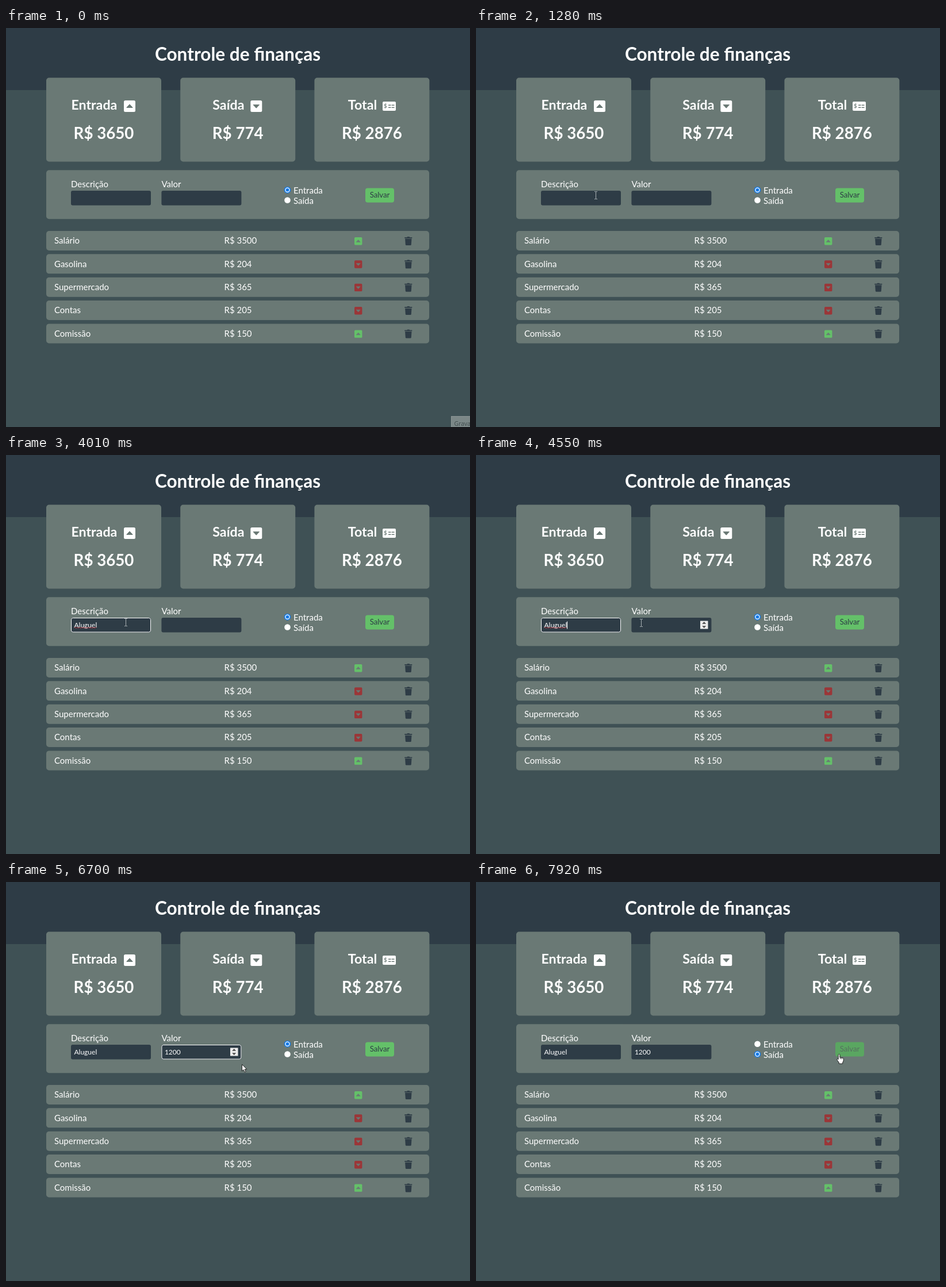
An HTML page that plays this animation: 807x694 px, repeating every 7.99 s.

```html
<!DOCTYPE html>
<html lang="pt-BR">
<head>
<meta charset="utf-8">
<title>Controle de finanças</title>
<style>
  html, body { margin: 0; height: 100%; overflow: hidden; background: #3f5155; }
  svg { display: block; font: 15px Lato, sans-serif; fill: #fff; }
  .dark { fill: #2e3c46; }
  .panel { fill: #6a7975; }
  .bold { font-weight: 700; }
  .mid { text-anchor: middle; }
  .typed { font-size: 12px; white-space: pre; }
  .ring { fill: none; stroke: #fff; }
</style>
</head>
<body>
<svg id="stage" width="807" height="694" viewBox="0 0 807 694"></svg>
<script>
const LOOP = 7990, BLINK = 530;
const GREEN = '#64c069', RED = '#9b3638';
const $ = id => document.getElementById(id);

const box = (x, y, w, h, r, cls, extra = '') =>
  `<rect x="${x}" y="${y}" width="${w}" height="${h}" rx="${r}" class="${cls}" ${extra}/>`;
const text = (x, y, str, cls = '', size = 15, extra = '') =>
  `<text x="${x}" y="${y}" class="${cls}" style="font-size:${size}px" ${extra}>${str}</text>`;
const caretSquare = (x, y, size, color, up) =>
  `<g transform="translate(${x} ${y}) scale(${size / 20})"><rect width="20" height="20" rx="2.5" fill="${color}"/>
   <path class="panel" stroke="#6a7975" stroke-linejoin="round" d="${up ? 'M4.8 12.4h10.4L10 6.8z' : 'M4.8 7.6h10.4L10 13.2z'}"/></g>`;
const trash = (x, y) =>
  `<path class="dark" transform="translate(${x} ${y})" d="M0 1h4l.8-1h3.4l.8 1h4v1.8h-13z
   M.8 3.6h11.4l-.7 10.2a1.4 1.4 0 0 1-1.4 1.2h-7.2a1.4 1.4 0 0 1-1.4-1.2z"/>`;
const card = (x, title, titleX, value) =>
  box(x, 86.5, 200, 146, 5, 'panel') + text(titleX, 142, title, 'bold', 23.2) +
  text(x + 100, 193, value, 'bold mid', 27.7);
const field = (x, label, id) =>
  text(x, 276.5, label) + box(x, 283, 139, 25.5, 3, 'dark') +
  `<text id="${id}" class="typed" x="${x + 5.5}" y="300.3"></text>` +
  box(x + .5, 283.5, 138, 24.5, 3, 'ring', `id="${id}Ring"`);
const radio = (y, label, id) =>
  `<circle cx="489.5" cy="${y}" r="5.3"/><g id="${id}"><circle cx="489.5" cy="${y}" r="5" fill="#fff" stroke="#0f78e6" stroke-width="1.6"/>
   <circle cx="489.5" cy="${y}" r="2.9" fill="#0f78e6"/></g>` + text(500, y + 6.3, label);

const rows = [['Salário', 3500, 1], ['Gasolina', 204, 0], ['Supermercado', 365, 0], ['Contas', 205, 0], ['Comissão', 150, 1]];

$('stage').innerHTML =
  box(0, 0, 807, 108, 0, 'dark') +
  text(403, 56.5, 'Controle de finanças', 'bold mid', 31.6) +
  card(70, 'Entrada', 113.5, 'R$ 3650') + caretSquare(205, 126, 20, '#fff', 1) +
  card(303.2, 'Saída', 359.3, 'R$ 774') + caretSquare(425.3, 126, 20, '#fff', 0) +
  card(536.4, 'Total', 594.8, 'R$ 2876') +
  box(655, 128, 23, 16, 2, '') + text(657.3, 139.3, '$', 'bold panel', 9) +
  '<path d="M665 134.3h4.5m1.2 0h4.8M665 138.2h4.5m1.2 0h4.8" stroke="#6a7975" stroke-width="1.4"/>' +
  box(70, 247.3, 666, 85, 5, 'panel') +
  field(113, 'Descrição', 'desc') + field(270.4, 'Valor', 'value') +
  '<path id="squiggle" d="M119 300.5q1-2 2 0t2 0' + 't2 0'.repeat(17) + '" fill="none" stroke="#d8323c" stroke-width=".9"/>' +
  '<g id="spinner"><rect x="390" y="288.5" width="13.5" height="14" fill="#ececec"/>' +
  '<path d="M393.2 293.8h7l-3.5-3.8zM393.2 297.2h7l-3.5 3.8z" fill="#4a4a4a"/></g>' +
  '<rect id="caret" y="289.5" width="1.1" height="13"/>' +
  radio(281.7, 'Entrada', 'income') + radio(299.5, 'Saída', 'expense') +
  box(625, 278.6, 50, 25, 4, '', 'id="button"') + text(650, 295.3, 'Salvar', 'mid', 13.2, 'id="buttonText"') +
  rows.map(([name, amount, up], i) => {
    const y = 353 + i * 40.35;
    return box(70, y, 666, 34, 5, 'panel') + text(84, y + 22.3, name) + text(379.5, y + 22.3, 'R$ ' + amount) +
      caretSquare(606, y + 11, 13.4, up ? GREEN : RED, up) + trash(693.3, y + 10);
  }).join('') +
  `<g id="tip"><rect x="774.5" y="675.5" width="40" height="25" fill="#7b8787" stroke="#8d9797"/>
   <text x="779.5" y="692" style="font:10.5px 'Open Sans',sans-serif" fill="#3f4b4d">Grava</text></g>` +
  `<g id="pointer">
   <path id="beam" d="M-2.5-6.5h2l.5.5.5-.5h2M0-6V6M-2.5 6.5h2l.5-.5.5.5h2" fill="none" stroke="#a9b1b4"/>
   <path id="arrow" d="M0 0V11.6L2.7 9.2L4.5 13.4L6.5 12.5L4.7 8.5H8.4z" stroke="#000" stroke-width=".8"/>
   <path id="hand" d="M-1.3.8a1.3 1.3 0 0 1 2.6 0V5.2l1.2-.2 1 .5 1.2-.1 1 .6 1.1.1.8 1V11l-1.4 2.8V16H-.2V14L-3.6 9.2a1.2 1.2 0 0 1 1.8-1.3l.5.6z
    M2.2 5.5V8M4.6 6V8.3" stroke="#000" stroke-width=".8" stroke-linejoin="round"/></g>`;

// Pointer stops: time, x, y
const path = [
  [250, 714, 679], [420, 620, 590], [720, 390, 430], [1010, 223, 332], [1080, 215, 312], [1210, 208.5, 291],
  [4080, 208.5, 291], [4280, 245, 294], [4480, 287.5, 292], [4800, 287.5, 292], [4820, 287.5, 291],
  [6450, 287.5, 291], [6660, 390, 315], [6890, 508, 328], [7040, 497, 308], [7160, 490.5, 299.3],
  [7440, 490.5, 299.3], [7640, 565, 304], [7860, 631.5, 300]
];
const descKeys = [2160, 2360, 2620, 2820, 3020, 3220, 3480];
const valueKeys = [5350, 5480, 5750, 5880];
const DESC_FOCUS = 1350, VALUE_FOCUS = 4680, SELECT = 7420;

function pointerAt(t) {
  const i = path.findIndex(p => p[0] > t);
  if (i < 0) return path.at(-1).slice(1);
  if (i === 0) return null;
  const [t0, x0, y0] = path[i - 1], [t1, x1, y1] = path[i];
  const k = (t - t0) / (t1 - t0);
  return [x0 + (x1 - x0) * k, y0 + (y1 - y0) * k];
}

const show = (id, on) => $(id).style.display = on ? '' : 'none';
const within = ([x, y], left, top, w, h) => x >= left && x <= left + w && y >= top && y <= top + h;

function type(id, word, keys, t) {
  $(id).textContent = word.slice(0, keys.filter(k => k <= t).length);
}

function draw(t) {
  show('tip', t < 70);
  type('desc', 'Aluguel', descKeys, t);
  type('value', '1200', valueKeys, t);

  const inDesc = t >= DESC_FOCUS && t < VALUE_FOCUS, inValue = t >= VALUE_FOCUS && t < SELECT;
  show('descRing', inDesc);
  show('valueRing', inValue);
  show('squiggle', t >= 4010 && inDesc);

  const active = $(inDesc ? 'desc' : 'value');
  const lastEvent = [DESC_FOCUS, ...descKeys, VALUE_FOCUS, ...valueKeys].filter(e => e <= t).pop();
  show('caret', (inDesc || inValue) && Math.floor((t - lastEvent) / BLINK) % 2 === 0);
  $('caret').setAttribute('x', +active.getAttribute('x') + active.getComputedTextLength() - .2);

  // The pointer is sampled at about 15 Hz
  const pos = pointerAt(Math.floor(t / 67) * 67);
  const overValue = pos && within(pos, 270, 283, 139, 25.5);
  const overField = overValue || pos && within(pos, 113, 283, 139, 25.5);
  const overButton = pos && within(pos, 625, 278.6, 50, 25);
  show('pointer', pos);
  if (pos) $('pointer').setAttribute('transform', `translate(${pos})`);
  show('beam', overField);
  show('hand', overButton);
  show('arrow', !overField && !overButton);
  show('spinner', overValue || inValue);

  show('income', t < SELECT);
  show('expense', t >= SELECT);
  $('button').style.fill = overButton ? '#5aa661' : GREEN;
  $('buttonText').style.fill = overButton ? '#567060' : '#2e3c46';
}

function frame() {
  draw(performance.now() % LOOP);
  requestAnimationFrame(frame);
}
frame();
</script>
</body>
</html>
```
